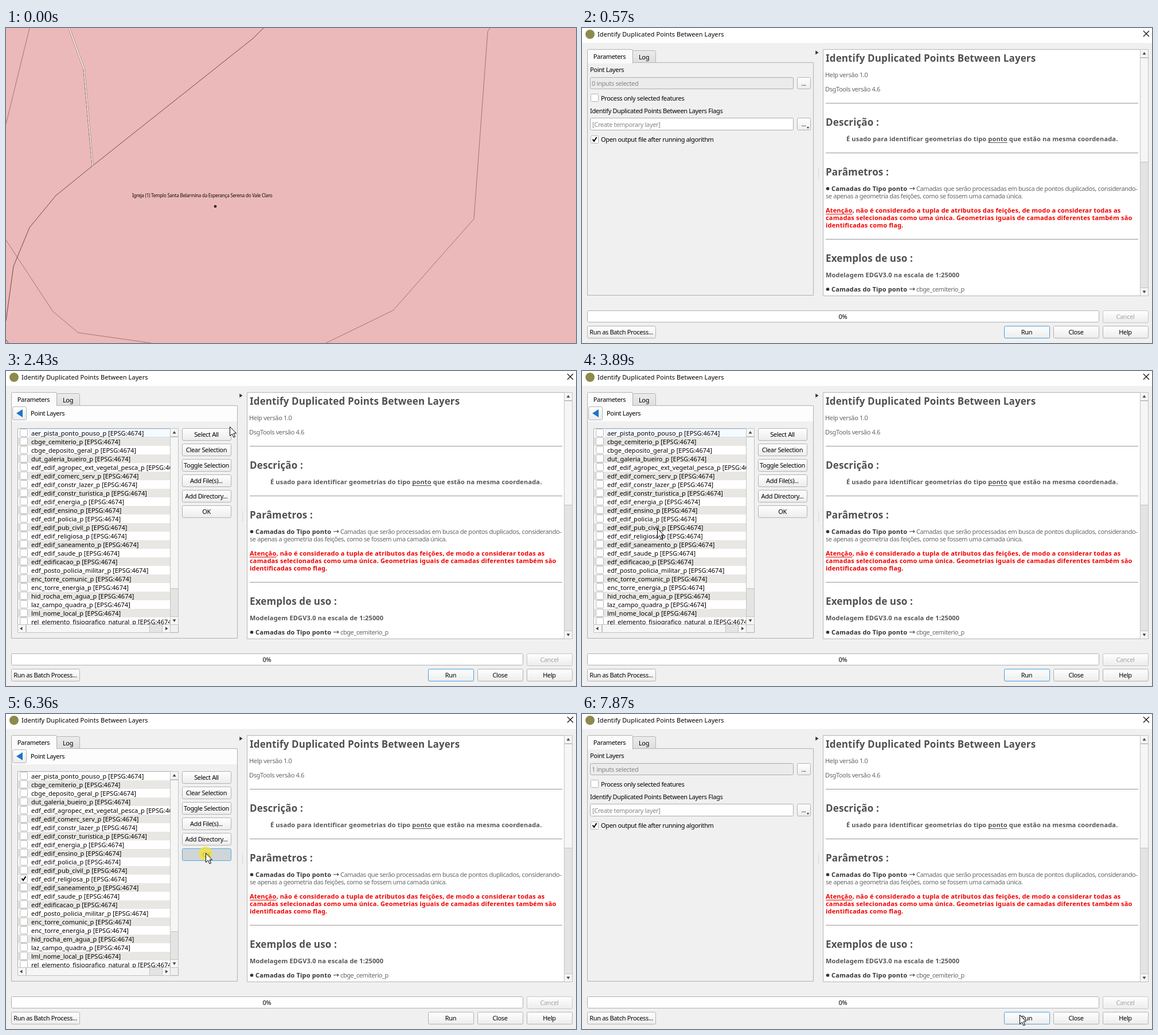
An HTML page with a canvas that plays this animation: 994 by 551 pixels, repeating every 8000 ms.

```html
<!DOCTYPE html>
<html lang="pt">
<head>
<meta charset="utf-8">
<title>Identify Duplicated Points Between Layers</title>
<style>
html, body { margin: 0; width: 994px; height: 551px; overflow: hidden; background: #ebb9b9 }
canvas { display: block }
</style>
</head>
<body>
<canvas id="stage" width="994" height="551"></canvas>
<script>
const W = 994, H = 551, LOOP = 8000;
const stage = document.getElementById('stage').getContext('2d');
let c = stage;

// name: [font, letter spacing]
const SANS = '"Noto Sans", sans-serif';
const STYLES = {
  ui: ['11px ' + SANS, '-0.34px'],
  doc: ['11px ' + SANS, '-0.4px'],
  list: ['11px ' + SANS, '0px'],
  title: ['11px ' + SANS, '0.07px'],
  bold: ['bold 11px ' + SANS, '0.17px'],
  head: ['bold 17px ' + SANS, '0.13px'],
  map: ['8px ' + SANS, '-0.21px'],
  arrow: ['13px "DejaVu Sans", sans-serif', '0px']
};

function setStyle(style) {
  [c.font, c.letterSpacing] = STYLES[style];
}

function text(s, x, y, color = '#000', style = 'ui', align = 'left') {
  setStyle(style);
  c.textAlign = align;
  c.fillStyle = color;
  c.fillText(s, x, y);
}

function fill(x, y, w, h, color) {
  c.fillStyle = color;
  c.fillRect(x, y, w, h);
}

function box(x, y, w, h, color, border = '#adadad', r = 0) {
  c.beginPath();
  c.roundRect(x + .5, y + .5, w - 1, h - 1, r);
  c.fillStyle = color;
  c.fill();
  c.lineWidth = 1;
  c.strokeStyle = border;
  c.stroke();
}

function path(points, color, width = 1, close = false) {
  c.beginPath();
  points.forEach(p => c.lineTo(...p));
  if (close) c.closePath();
  c.lineWidth = width;
  c.strokeStyle = color;
  c.stroke();
}

function shape(points, color) {
  c.beginPath();
  points.forEach(p => c.lineTo(...p));
  c.fillStyle = color;
  c.fill();
}

function disc(x, y, r, color) {
  c.beginPath();
  c.arc(x, y, r, 0, 7);
  c.fillStyle = color;
  c.fill();
}

function shade(y, h, top, bottom) {
  const g = c.createLinearGradient(0, y, 0, y + h);
  g.addColorStop(0, top);
  g.addColorStop(1, bottom);
  return g;
}

function button(label, x, y, w, h = 22, { border = '#b2b2b2', color = '#000', pressed = false } = {}) {
  box(x, y, w, h, pressed ? '#d0d5d9' : shade(y, h, '#fff', '#ececec'), pressed ? '#5aa5dc' : border, 2);
  text(label, x + w / 2 - .5, y + h / 2 + 4, pressed ? '#444' : color, 'ui', 'center');
}

function tick(x, y) {
  path([[x + 3.5, y + 6.5], [x + 6, y + 10], [x + 10.5, y + 3]], '#000', 2);
}

function checkbox(x, y, checked) {
  box(x, y, 14, 14, '#fff', '#b5b5b5', 1);
  if (checked) tick(x, y);
}

// Small triangle pointing along (dx, dy)
function triangle(x, y, dx, dy, size = 3, color = '#444') {
  shape([[x + dx * size, y + dy * size],
    [x - dx * size / 2 - dy * size, y - dy * size / 2 - dx * size],
    [x - dx * size / 2 + dy * size, y - dy * size / 2 + dx * size]], color);
}

const TRACK = '#e4e4e4', THUMB = '#f6f6f6', GROOVE = '#c2c2c2';

function scrollbarV(x, y, h, from, to) {
  box(x, y, 15, h, TRACK, GROOVE);
  box(x, y, 15, 15, THUMB, GROOVE);
  box(x, from, 15, to - from, THUMB, GROOVE);
  box(x, y + h - 15, 15, 15, THUMB, GROOVE);
  triangle(x + 7.5, y + 8, 0, -1);
  triangle(x + 7.5, y + h - 8, 0, 1);
}

function drawMapLines() {
  const faint = '#a37272', dark = '#6d4848';
  path([[41, 0], [0, 168]], faint);
  path([[844, 0], [840, 6], [816, 334], [675, 494], [558, 551]], faint);
  path([[0, 371], [82, 496], [126, 533], [253, 551]], faint);
  path([[449, 0], [431, 18], [151, 241], [87, 293], [41, 349], [13, 417], [0, 512]], dark);
  path([[0, 545], [4, 551]], dark);
  const road = [[110, 0], [136, 72], [151, 241]];
  path(road, '#9b6b6b', 3);
  path(road, '#fff', 1.6);
  c.setLineDash([5, 3]);
  path([[135, 72], [150, 241]], '#9b6b6b', .8);
  c.setLineDash([]);
  text('Igreja (1) Templo Santa Belarmina da Esperança Serena do Vale Claro', 220, 296, '#100808', 'map');
  disc(365, 312, 2.3, '#1c1010');
  disc(365, 312, .8, '#8a5a50');
}

function drawParams(t) {
  const n = t < 6420 ? 0 : 1;
  text('Point Layers', 14, 77);
  box(14, 86, 355, 21, '#ebebeb', '#adadad', 2);
  text(n + ' inputs selected', 17, 101, '#858585');
  button('...', 375, 86, 24, 21, { pressed: t >= 2300 && t < 2360 });
  checkbox(15, 115, false);
  text('Process only selected features', 33, 127);
  text('Identify Duplicated Points Between Layers Flags', 14, 149);
  box(14, 157, 355, 22, '#fff', '#adadad', 2);
  text('[Create temporary layer]', 18, 173, '#858585');
  button('...', 375, 157, 24, 22);
  triangle(394, 174, 0, 1, 2.2);
  checkbox(15, 188, true);
  text('Open output file after running algorithm', 33, 199);
}

const LAYERS = `aer_pista_ponto_pouso cbge_cemiterio cbge_deposito_geral dut_galeria_bueiro
edf_edif_agropec_ext_vegetal_pesca edf_edif_comerc_serv edf_edif_constr_lazer
edf_edif_constr_turistica edf_edif_energia edf_edif_ensino edf_edif_policia
edf_edif_pub_civil edf_edif_religiosa edf_edif_saneamento edf_edif_saude edf_edificacao
edf_posto_policia_militar enc_torre_comunic enc_torre_energia hid_rocha_em_agua
laz_campo_quadra lml_nome_local rel_elemento_fisiografico_natural`.split(/\s+/);
const CHOSEN = 12;

function drawLayerList(t) {
  fill(10, 61, 393, 27, '#fdfdfd');
  button('', 11, 62, 25, 24);
  shape([[18, 74], [29, 67], [29, 81]], '#1c74c8');
  text('Point Layers', 43, 78);

  box(20, 100, 281, 358, '#fff');
  c.save();
  c.beginPath();
  c.rect(21, 101, 265, 342);
  c.clip();
  LAYERS.forEach((name, i) => {
    const y = 101 + 15 * i;
    if (i % 2) fill(21, y, 265, 15, '#e9e7e4');
    if (i == 0 && t < 6360) box(41, y, 246, 15, '#f5faff', '#cfe4f5');
    checkbox(24, y, i == CHOSEN && t >= 4430);
    text(name + '_p [EPSG:4674]', 44, y + 12, '#000', 'list');
  });
  c.restore();
  scrollbarV(286, 100, 344, 115, 381);
  box(20, 443, 267, 15, TRACK, GROOVE);
  box(20, 443, 15, 15, THUMB, GROOVE);
  box(35, 443, 216, 15, THUMB, GROOVE);
  box(272, 443, 15, 15, THUMB, GROOVE);
  triangle(27, 450.5, -1, 0);
  triangle(279.5, 450.5, 1, 0);
  fill(287, 444, 13, 13, '#f0f0f0');

  ['Select All', 'Clear Selection', 'Toggle Selection', 'Add File(s)...', 'Add Directory...', 'OK']
    .forEach((label, i) => button(label, 307, 100 + 27 * i, 86, 22, { pressed: i == 5 && t >= 6360 }));
}

function underline(before, word, x, y, color) {
  setStyle('bold');
  fill(x + c.measureText(before).width, y + 2, c.measureText(word).width, 1, color);
}

function bullet(y, rest) {
  disc(428.5, y - 4, 2.8, '#333');
  text('Camadas do Tipo ponto', 435, y, '#333', 'bold');
  text('→', 570, y, '#444', 'arrow');
  text(rest, 583, y, '#666', 'doc');
}

function drawHelp() {
  const gray = '#505050', red = '#f00000';
  box(420, 37, 568, 432, '#fff', '#b4b4b4');
  scrollbarV(973, 37, 432, 52, 235);
  [['Identify Duplicated Points Between Layers', 59], ['Descrição :', 171],
    ['Parâmetros :', 258], ['Exemplos de uso :', 409]]
    .forEach(([s, y]) => text(s, 425, y, gray, 'head'));
  [131, 218, 369].forEach(y => fill(425, y, 545, 1, '#949494'));
  text('Help versão 1.0', 424, 86, '#666');
  text('DsgTools versão 4.6', 424, 111, '#666');
  const usage = 'É usado para identificar geometrias do tipo ';
  text(usage + 'ponto que estão na mesma coordenada.', 461, 198, '#555', 'bold');
  underline(usage, 'ponto', 461, 198, '#555');
  bullet(285, 'Camadas que serão processadas em busca de pontos duplicados, considerando-');
  text('se apenas a geometria das feições, como se fossem uma camada única.', 425, 298, '#666', 'doc');
  ['Atenção, não é considerado a tupla de atributos das feições, de modo a considerar todas as',
    'camadas selecionadas como uma única. Geometrias iguais de camadas diferentes também são',
    'identificadas como flag.'].forEach((s, i) => text(s, 425, 323 + 13 * i, red, 'bold'));
  underline('', 'Atenção', 425, 323, red);
  text('Modelagem EDGV3.0 na escala de 1:25000', 425, 436, '#555', 'bold');
  bullet(461, 'cbge_cemiterio_p');
}

function drawDialog(t) {
  fill(-3, -6, 1003, 560, '#f0f0f0');
  fill(-3, -6, 1003, 32, '#fff');
  disc(14, 11, 8, '#8c8a4c');
  text('Identify Duplicated Points Between Layers', 27, 15, '#000', 'title');
  path([[979, 5], [989, 15]], '#111', 1.2);
  path([[989, 5], [979, 15]], '#111', 1.2);

  box(9, 60, 395, 408, '#f0f0f0', '#b0b0b0');
  box(88, 39, 41, 22, shade(39, 22, '#ececec', '#dedede'), '#b4b4b4', [2, 2, 0, 0]);
  box(9, 37, 80, 25, '#fbfbfb', '#b0b0b0', [2, 2, 0, 0]);
  fill(10, 60, 78, 2, '#fbfbfb');
  text('Parameters', 48, 54, '#000', 'ui', 'center');
  text('Log', 108, 55, '#000', 'ui', 'center');
  (t >= 2360 && t < 6420 ? drawLayerList : drawParams)(t);

  triangle(409, 43, 1, 0, 3.5, '#333');
  for (let y = 246; y < 263; y += 3) fill(412, y, 1, 1, '#aaa');
  drawHelp();

  box(9, 494, 893, 21, '#fff', '#b0b0b0', 2);
  text('0%', 455, 509, '#000', 'ui', 'center');
  button('Cancel', 908, 494, 80, 22, { color: '#a5a5a5', border: '#c6c6c6' });
  button('Run as Batch Process...', 9, 521, 120);
  const plain = t < 570 || t >= 6360 && t < 6420;
  button('Run', 736, 521, 80, 22, { border: plain ? '#b2b2b2' : '#4a9edb' });
  button('Close', 822, 521, 80);
  button('Help', 908, 521, 80);
}

// Pointer route: time, x, y
const ROUTE = [
  [1100, 898, 296], [1770, 383, 98], [1900, 390, 97], [2765, 390, 97],
  [3630, 156, 266], [3890, 128, 276], [4095, 30, 288], [4365, 30, 288],
  [5170, 348, 243], [6755, 348, 243], [7610, 765, 522], [7870, 763, 526], [LOOP, 763, 526]
];
const CLICKS = [[2300, 2430], [4290, 4430], [6360, 6420]];
const TICK = 200 / 3;

function pointerAt(t) {
  const q = Math.max(1100, Math.floor((t - 33) / TICK + .06) * TICK + 33);
  const i = ROUTE.findIndex(p => p[0] > q);
  const [t0, x0, y0] = ROUTE[i - 1], [t1, x1, y1] = ROUTE[i];
  const u = (q - t0) / (t1 - t0), k = u * u * (3 - 2 * u);
  return [Math.round(x0 + (x1 - x0) * k), Math.round(y0 + (y1 - y0) * k)];
}

function drawPointer(t) {
  const [x, y] = pointerAt(t);
  if (CLICKS.some(([on, off]) => t >= on && t < off)) disc(x, y + 1, 12, 'rgba(246,228,40,.7)');
  const arrow = [[0, 0], [0, 16], [4, 12.5], [6.5, 18.5], [9, 17.5], [6.5, 11.5], [11, 11.5]]
    .map(([dx, dy]) => [x + dx + .5, y + dy + .5]);
  shape(arrow, '#fff');
  path(arrow, '#000', 1, true);
}

// The opening window is composed off stage so that it fades as one piece
const opening = document.createElement('canvas');
opening.width = W;
opening.height = H;

function drawOpening() {
  c = opening.getContext('2d');
  c.setTransform(.957, 0, 0, .957, 20.6, 11.5);
  drawDialog(500);
  c = stage;
  c.globalAlpha = .2;
  c.drawImage(opening, 0, 0);
  c.globalAlpha = 1;
}

function frame(now) {
  const t = now % LOOP;
  if (t < 570) {
    fill(0, 0, W, H, '#ebb9b9');
    if (t >= 500) drawOpening();
    drawMapLines();
  } else {
    drawDialog(t);
    if (t >= 1100) drawPointer(t);
  }
  requestAnimationFrame(frame);
}
requestAnimationFrame(frame);
</script>
</body>
</html>
```
